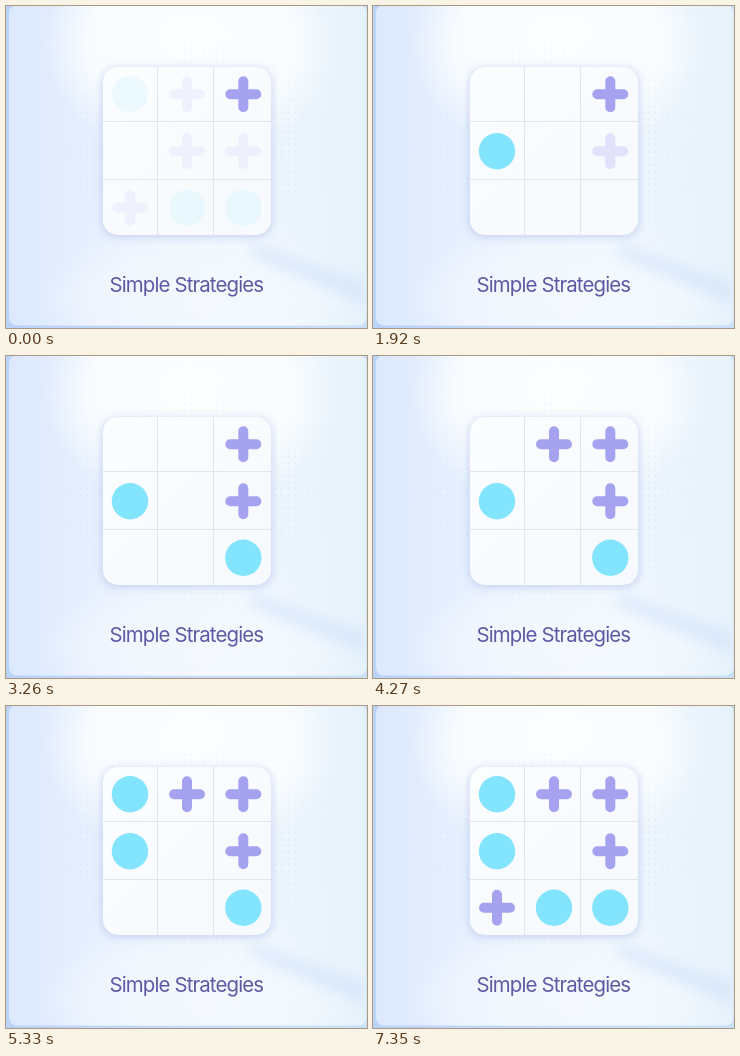
Animation, 361 px wide and 322 px high, one loop 8000 ms. Source, as an HTML page:

```html
<!DOCTYPE html>
<html lang="en">
<head>
<meta charset="utf-8">
<title>Simple Strategies</title>
<style>
  html, body { margin: 0; width: 100%; height: 100%; overflow: hidden; background: #c3d8f8; }
  svg { display: block; width: 361px; height: 322px; }
  text { font: 400 20.4px Inter, "Open Sans", sans-serif; letter-spacing: -.86px; fill: #5b5aa2; }
</style>
</head>
<body>
<svg viewBox="0 0 361 322">
  <defs>
    <linearGradient id="edge" x2="1" y2="0">
      <stop stop-color="#b9d2f8"/><stop offset=".5" stop-color="#cbdcf8"/><stop offset="1" stop-color="#c9e0f6"/>
    </linearGradient>
    <linearGradient id="card" x2="1" y2="0">
      <stop stop-color="#dce8fd"/><stop offset=".3" stop-color="#e9f1fe"/>
      <stop offset=".7" stop-color="#eff6fe"/><stop offset="1" stop-color="#e6f2fb"/>
    </linearGradient>
    <radialGradient id="glow">
      <stop stop-color="#fcfeff"/><stop offset=".7" stop-color="#fafdff" stop-opacity=".9"/>
      <stop offset="1" stop-color="#f8fcff" stop-opacity="0"/>
    </radialGradient>
    <linearGradient id="board" x2="1" y2="1">
      <stop stop-color="#fbfdff"/><stop offset="1" stop-color="#f6f9fd"/>
    </linearGradient>
    <radialGradient id="fade">
      <stop offset=".5" stop-color="#fff"/><stop offset="1" stop-color="#fff" stop-opacity="0"/>
    </radialGradient>
    <mask id="halo"><ellipse cx="184" cy="143" rx="150" ry="122" fill="url(#fade)"/></mask>
    <pattern id="dots" width="6.5" height="6.5" patternUnits="userSpaceOnUse">
      <circle cx="3" cy="3" r=".8" fill="#c5d5f1"/>
    </pattern>
    <filter id="soft" x="-50%" y="-50%" width="200%" height="200%"><feGaussianBlur stdDeviation="7"/></filter>
    <filter id="shade" x="-20%" y="-20%" width="140%" height="140%"><feGaussianBlur stdDeviation="4"/></filter>
    <clipPath id="frame"><rect x="3" y="-1" width="357.5" height="320.5" rx="8"/></clipPath>
  </defs>

  <rect width="361" height="322" fill="url(#edge)"/>
  <g clip-path="url(#frame)">
    <rect width="361" height="322" fill="url(#card)"/>
    <ellipse cx="185" cy="38" rx="148" ry="115" fill="url(#glow)"/>
    <ellipse cx="195" cy="292" rx="160" ry="75" fill="url(#glow)" opacity=".45"/>
    <path d="M245 236L361 278V298L245 250Z" fill="#d3e3fb" opacity=".75" filter="url(#soft)"/>
    <rect width="361" height="322" fill="url(#dots)" mask="url(#halo)" opacity=".6"/>
  </g>
  <rect x="96" y="62" width="170" height="169" rx="15" fill="#aebde6" opacity=".6" filter="url(#shade)"/>
  <rect x="97" y="61" width="168" height="168" rx="15" fill="url(#board)"/>
  <path d="M151.5 61V229M207.5 61V229M97 115.5H265M97 173.5H265" stroke="#dfe6ee"/>
  <g id="pieces"></g>
  <text x="103.5" y="286">Simple Strategies</text>
</svg>
<script>
const LOOP = 8000;
const COLS = [124, 181, 237.3], ROWS = [88.2, 145.2, 201.8];

// Each move: mark, column, row, start and end of its entrance.
const MOVES = [
  ['x', 2, 0, -1, -1],
  ['o', 0, 1, 900, 1130],
  ['x', 2, 1, 1920, 2190],
  ['o', 2, 2, 3020, 3260],
  ['x', 1, 0, 4040, 4270],
  ['o', 0, 0, 5100, 5330],
  ['x', 0, 2, 6140, 6380],
  ['o', 1, 2, 7120, 7350]
];
// Remains of the previous round, fading out at the start.
const GHOSTS = [
  ['o', 0, 0], ['x', 1, 0], ['x', 1, 1], ['x', 2, 1],
  ['x', 0, 2], ['o', 1, 2], ['o', 2, 2]
];
const ALPHA = { x: [.28, .62, .88, 1], o: [.27, .65, .9, 1] };
const SCALE = { x: [1, 1, 1, 1], o: [.39, .76, .95, 1] };

const layer = document.getElementById('pieces');

function makePiece([mark, col, row]) {
  const tag = mark === 'o' ? 'circle' : 'path';
  const node = document.createElementNS('http://www.w3.org/2000/svg', tag);
  const attrs = mark === 'o'
    ? { r: 18.2, fill: '#82e4fd' }
    : { d: 'M-13 0H13M0-13V13', stroke: '#a5a3ef', 'stroke-width': 10, 'stroke-linecap': 'round', fill: 'none' };
  for (const name in attrs) node.setAttribute(name, attrs[name]);
  layer.append(node);
  return (alpha, scale) => {
    node.setAttribute('opacity', alpha);
    node.setAttribute('transform', `translate(${COLS[col]} ${ROWS[row]}) scale(${scale})`);
  };
}

const ghosts = GHOSTS.map(makePiece);
const pieces = MOVES.map(makePiece);

function render(time) {
  const ghostAlpha = time < 80 ? .12 : time < 160 ? .05 : 0;
  ghosts.forEach(show => show(ghostAlpha, 1));
  MOVES.forEach(([mark, , , start, end], i) => {
    if (time < start) return pieces[i](0, 1);
    const step = time >= end ? 3 : Math.floor((time - start) / (end - start) * 3);
    pieces[i](ALPHA[mark][step], SCALE[mark][step]);
  });
}

const origin = performance.now();
function tick() {
  render((performance.now() - origin) % LOOP);
  requestAnimationFrame(tick);
}
tick();
</script>
</body>
</html>
```
